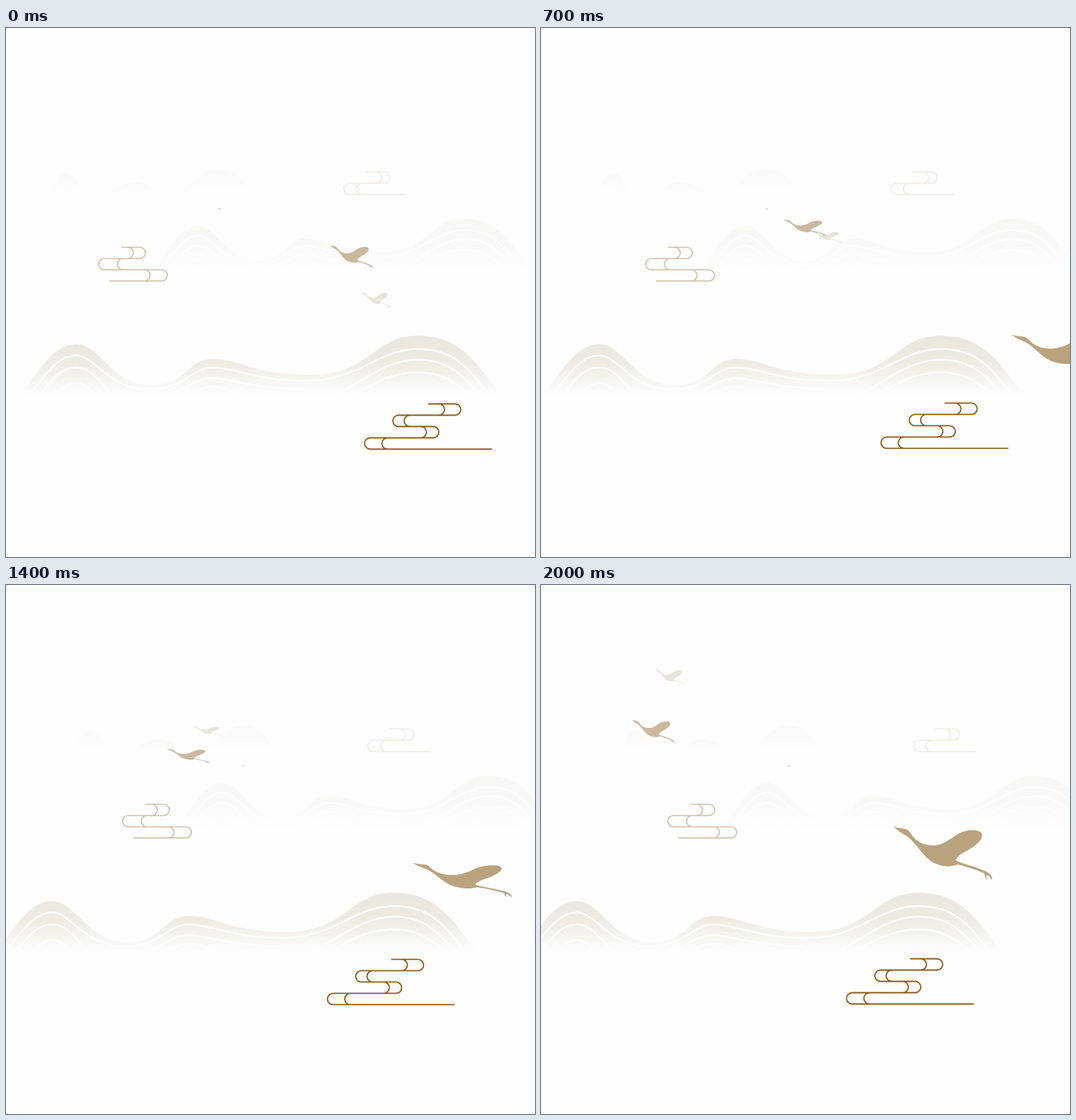
An HTML page for the animation above (2100 ms loop, 748 by 748 pixels).

```html
<!DOCTYPE html>
<html lang="en">
<head>
<meta charset="utf-8">
<title>Misty hills and cranes</title>
<style>
  html, body { margin: 0; width: 100%; height: 100%; overflow: hidden; background: #fefefe; }
  svg { display: block; width: 100%; height: 100%; }
  .cloud { fill: none; }
</style>
</head>
<body>
<svg viewBox="0 0 748 748">
  <defs>
    <linearGradient id="mist" x2="0" y2="1">
      <stop stop-color="#ece7dd"/>
      <stop offset=".45" stop-color="#ece7dd" stop-opacity=".85"/>
      <stop offset="1" stop-color="#ece7dd" stop-opacity="0"/>
    </linearGradient>

    <g id="hills">
      <path fill="url(#mist)" d="M18 519C45 490 65 447 99 447S150 505 204 505S255 468 293 468S350 490.5 432 490.5S520 435 582 435S665 475 700 519Z"/>
      <g fill="none" stroke="#fefefe" stroke-width="2.5">
        <path d="M34 517C55 492 72 463 99 463S145 511 200 511S260 480 293 480S350 499 425 499S525 454 582 454S655 486 684 519"/>
        <path d="M51 515C66 495 80 480 99 480S130 496 148 517M238 517C258 506 274 495 293 495S345 509 420 511M466 518C500 504 535 469 582 469S644 492 670 519"/>
        <path d="M74 517C82 508 89 502 99 502S116 508 124 517M260 518C272 511 281 507 293 507S314 511 328 518M494 518C520 502 545 487 582 487S634 502 656 519"/>
      </g>
    </g>

    <path id="crane" d="M0 0C5 3 12 3 17 4C23 5 25 12 30 17C38 25 49 28 59 27C79 25 85 11 102 7C111 5 121 5 125 10C128 18 119 25 112 30C103 36 92 40 88 48C97 53 112 56 124 61C132 64 138 67 140 73L139 76C137 74 138 71 132 69C131 72 132 74 134 76C129 74 130 70 129 67C117 61 103 57 91 54C85 57 75 58 66 55C54 52 47 45 39 35C31 25 25 18 18 13C11 10 5 5 0 0Z"/>
  </defs>

  <g id="back">
    <g fill="url(#mist)" opacity=".17">
      <path d="M62 232C70 222 74 205 85 205S100 222 109 232Z"/>
      <path d="M146 232C160 226 168 218 182 218S204 226 220 232Z"/>
      <path d="M244 232C268 222 274 199 301 199S332 216 347 232Z"/>
    </g>
    <use href="#hills" transform="translate(194.8 -100) scale(.78 .85)" opacity=".27"/>
    <path class="cloud" stroke="#eeeae3" stroke-width="1.7" d="M509 203.5H535a8 8 0 0 1 0 16H486a8 8 0 0 0 0 16H567M523 203.5a8 8 0 0 1 0 16M503.500 219.500a8 8 0 0 0 0 16"/>
    <path class="cloud" stroke="#d2c2a7" stroke-width="1.7" d="M163 310H189a8 8 0 0 1 0 16H139a8 8 0 0 0 0 16H220.500a7.800 7.800 0 0 1 0 15.600H146M172 310a8 8 0 0 1 0 16M165.500 326a8 8 0 0 0 0 16M196 342a7.800 7.800 0 0 1 0 15.600"/>
    <path id="speck" class="cloud" stroke="#b9b2a6" stroke-width=".9" d="M-2 0L0-.8L2 1.200"/>
  </g>
  <use id="front" href="#hills"/>
  <path id="darkCloud" class="cloud" stroke="#8b5d16" stroke-width="1.8" d="M597 531.500H635a8 8 0 0 1 0 16H555a8 8 0 0 0 0 16H604a8 8 0 0 1 0 16H515a8 8 0 0 0 0 16H687M612 531.500a8 8 0 0 1 0 16M571 547.500a8 8 0 0 0 0 16M586.500 563.500a8 8 0 0 1 0 16M539.500 579.500a8 8 0 0 0 0 16"/>
  <g id="flock" fill="#b0956a"></g>
</svg>
<script>
const STEP = 100, LOOP = 2100;
const $ = id => document.getElementById(id);
const move = (el, x, y, sx = 1, sy = 1) =>
  el.setAttribute('transform', `translate(${x} ${y}) scale(${sx} ${sy})`);

// start x, centre y, velocity per step, size, opacity
const cranes = [
  { x: 502, y: 384.5, vx: -17.05, vy: -12.7, size: .304, alpha: .25 },
  { x: 458, y: 323.5, vx: -16.5, vy: -5.83, size: .436, alpha: .65 },
  { x: 755, y: 505.6, vx: -12.85, vy: -6.33, size: 1, alpha: .87 }
];

for (const c of cranes) {
  c.el = document.createElementNS('http://www.w3.org/2000/svg', 'g');
  c.el.setAttribute('opacity', c.alpha);
  c.el.innerHTML = '<use href="#crane" y="-38"/>';
  $('flock').append(c.el);
}

function draw(now) {
  const n = Math.floor(now % LOOP / STEP);
  // wings squash and stretch once every ten steps
  const phase = n % 10;
  const flap = 1 - .09 * Math.min(phase, 10 - phase);

  move($('back'), 2.42 * n, 0);
  move($('front'), -2.42 * n, 0);
  move($('darkCloud'), -3.75 * n, -.15 * n);
  move($('speck'), 302, 256, 1, flap);
  for (const c of cranes)
    move(c.el, c.x + c.vx * n, c.y + c.vy * n, c.size, c.size * flap);
}

function tick() {
  draw(performance.now());
  requestAnimationFrame(tick);
}
tick();
</script>
</body>
</html>
```
